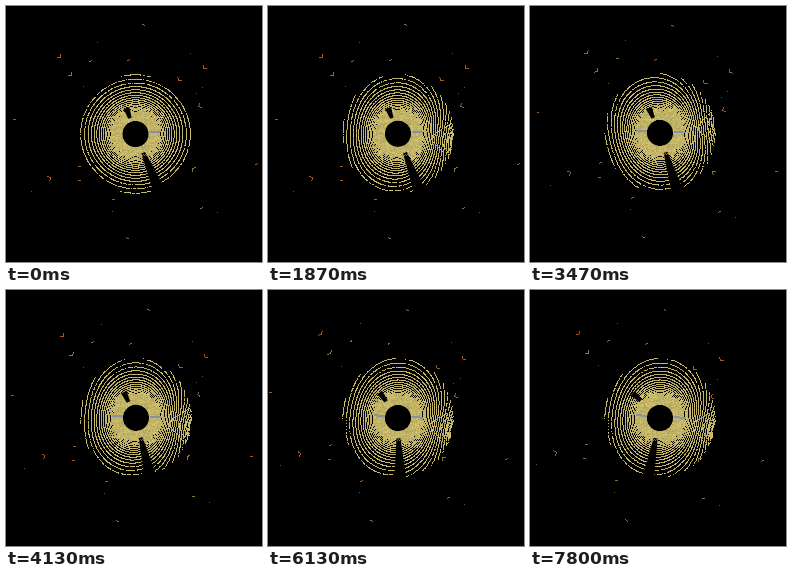
An HTML page with a canvas for the animation above (8000 ms loop, 256x256 px).

```html
<!DOCTYPE html>
<html lang="en">
<head>
<meta charset="utf-8">
<title>Range scan</title>
<style>
html, body { margin: 0; width: 100%; height: 100%; overflow: hidden; background: #000; }
canvas { display: block; width: 100vw; height: 100vh; image-rendering: pixelated; }
</style>
</head>
<body>
<canvas id="view" width="256" height="256"></canvas>
<script>
const ctx = document.getElementById('view').getContext('2d');
const LOOP = 8000, FIRST = 200, SWEEP = 1000 / 3;
const RAD = Math.PI / 180;
const HOLE = 13;
const ORANGE = '#a8581c', TAN = '#8c7438', DIM = '#5c5230', STREAK = '#8b91a4';

// Obstacles seen as corners and as short strokes
const CORNERS = [[54, 51], [65, 69], [172, 74], [197, 62], [192, 100], [186, 162], [44, 171]];
const STROKES = [[83, 55], [121, 54], [136, 18], [7, 113], [72, 160], [72, 174],
  [106, 193], [120, 231], [249, 158], [194, 202]];

function noise(x, y) {
  const n = Math.sin(x * 12.9898 + y * 78.233) * 43758.5453;
  return n - Math.floor(n);
}

function plot(x, y, color) {
  ctx.fillStyle = color;
  ctx.fillRect(Math.round(x), Math.round(y), 1, 1);
}

function fillPath(points) {
  ctx.fillStyle = '#000';
  ctx.beginPath();
  for (const p of points) ctx.lineTo(...p);
  ctx.fill();
}

function poseAt(t) {
  const u = t / 7800;
  const move = Math.max(0, (t - 1870) / 5930);
  const bump = Math.exp(-(((t - 2800) / 700) ** 2));
  return {
    cx: 129 + Math.min(.5, t / 1000),
    cy: 127.5 - 1.5 * bump,
    turn: 6.2 * RAD * move ** .4,
    drift: -15 * move ** 1.5,
    bend: .16 * Math.min(1, t / 1500),
    axis: (10 - 28 * bump) * RAD,
    wedge: (67 + 36 * u * u) * RAD,
    slotX: 122 - 17.5 * u ** 3,
    slotY: 106.5
  };
}

// Ring spacing widens outwards; the slope of the ground bends the outer rings most
function drawRings({ cx, cy, bend, axis }) {
  for (let k = -12; k < 28; k++) {
    const base = (.165 + .0056 * k) ** (-1 / .45);
    for (let th = 0; th < 2 * Math.PI; th += .8 * RAD) {
      const warp = .6 * Math.cos(th - 200 * RAD) - Math.cos(2 * (th - axis));
      const r = base * (1 + bend * warp * base / 55);
      const dx = r * Math.cos(th), dy = r * Math.sin(th);
      if (r < HOLE || Math.hypot(dx / 55.5, dy / 59.5) > 1) continue;
      const n = noise(Math.round(dx), Math.round(dy));
      if (r > 48 && n < .15) continue;
      const v = 175 + n * 38;
      plot(cx + dx, cy + dy, `rgb(${v | 0},${v * .93 | 0},${v * .53 | 0})`);
    }
  }
}

function drawShadows({ cx, cy, wedge, slotX, slotY }) {
  const at = (r, a) => [cx + r * Math.cos(a), cy + r * Math.sin(a)];
  const half = 5.5 * RAD;
  fillPath([at(21, wedge - half), at(66, wedge - half), at(66, wedge + half), at(21, wedge + half)]);
  const [x, y] = at(23, wedge);
  for (let i = -2; i < 3; i++) plot(x + i, y - Math.abs(i) % 2, ORANGE);

  const dir = Math.atan2(slotY - cy, slotX - cx);
  const mid = Math.hypot(slotX - cx, slotY - cy);
  const wide = 2.5 / mid;
  fillPath([at(mid - 6, dir - wide), at(mid + 5, dir - wide), at(mid + 5, dir + wide), at(mid - 6, dir + wide)]);
}

function drawStreaks({ cx, cy, turn }, t) {
  for (let d = HOLE + 1; d < HOLE + 12; d++) {
    for (const row of [-1, 0]) {
      plot(cx + d, cy - 1 + row + d * turn / 2, STREAK);
      if (t > 3000) plot(cx - d, cy - 1 + row - d * turn / 2, STREAK);
    }
  }
}

function drawHole({ cx, cy }) {
  ctx.fillStyle = '#000';
  ctx.beginPath();
  ctx.arc(cx + .5, cy + .5, HOLE, 0, 2 * Math.PI);
  ctx.fill();
}

function drawObstacles({ turn, drift }) {
  const c = Math.cos(turn), s = Math.sin(turn);
  const place = (x, y) => [
    129 + (x - 129) * c - (y - 128) * s + drift,
    128 + (x - 129) * s + (y - 128) * c
  ];
  const arm = (x, y, angle, length, color) => {
    for (let d = 0; d < length; d++) plot(x + d * Math.cos(angle), y + d * Math.sin(angle), color);
  };
  const tint = (x, y) => noise(x, y) < .5 ? ORANGE : TAN;

  // Two sides of each corner lead away from the sensor
  for (const [px, py] of CORNERS) {
    const [x, y] = place(px, py);
    const out = Math.atan2(y - 128, x - 129);
    arm(x, y, out - 50 * RAD, 4, tint(px, py));
    arm(x, y, out + 50 * RAD, 4, tint(px, py));
  }
  for (const [px, py] of STROKES) {
    const [x, y] = place(px, py);
    arm(x, y, -.4 + noise(py, px), 3, tint(px, py));
  }
  for (let i = 1; i <= 8; i++) {
    const a = 2 * Math.PI * noise(i, 3), r = 70 + 50 * noise(i, 8);
    plot(...place(129 + r * Math.cos(a), 128 + r * Math.sin(a)), DIM);
  }
}

function draw(t) {
  const pose = poseAt(t);
  ctx.fillStyle = '#000';
  ctx.fillRect(0, 0, 256, 256);
  drawRings(pose);
  drawStreaks(pose, t);
  drawShadows(pose);
  drawHole(pose);
  drawObstacles(pose);
}

let shown = -1;
const start = performance.now();
function tick() {
  const t = (performance.now() - start) % LOOP;
  const sweep = Math.floor((t - FIRST) / SWEEP);
  const time = sweep < 0 ? 0 : FIRST + sweep * SWEEP;
  if (time !== shown) draw(shown = time);
  requestAnimationFrame(tick);
}
tick();
</script>
</body>
</html>
```
